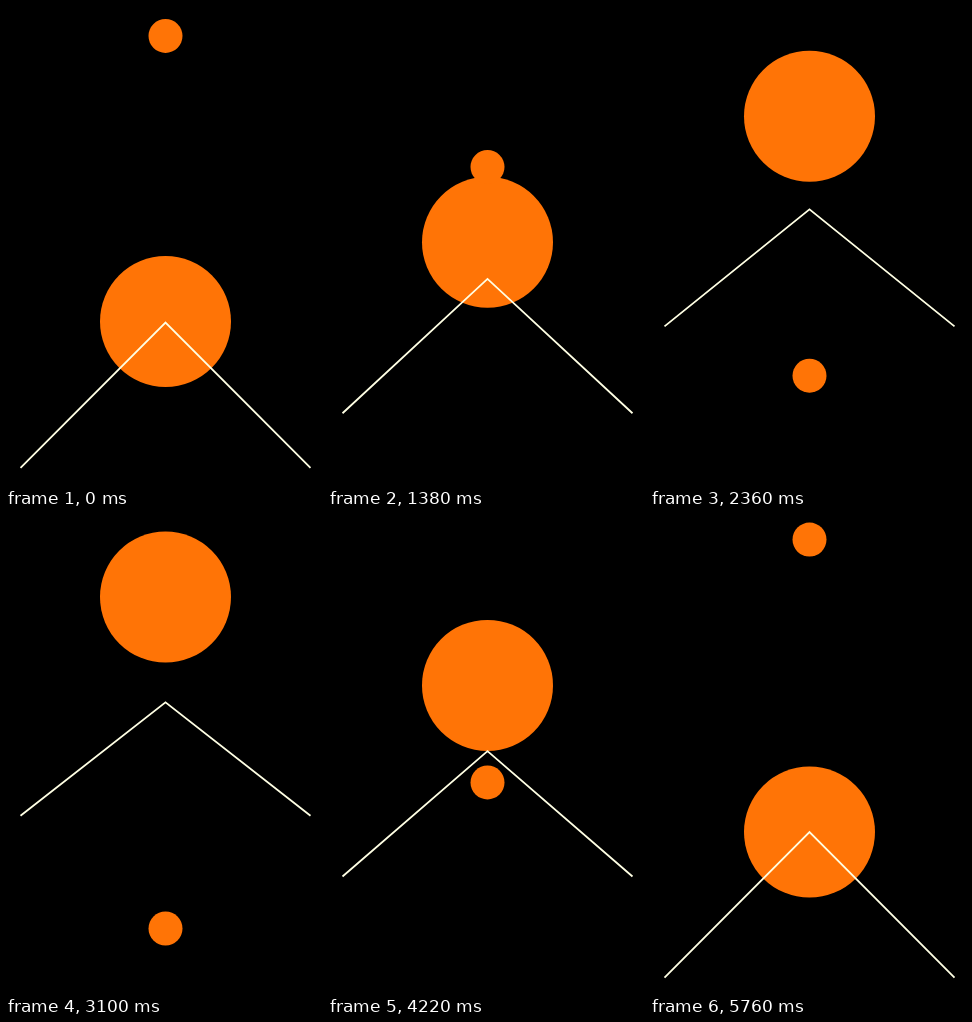
Write an HTML page that moves like this. It is 316x480 px and loops after 5780 ms.

```html
<!DOCTYPE html>
<html lang="en">
<head>
<meta charset="utf-8">
<title>Trading places</title>
<style>
  html, body { margin: 0; width: 100%; height: 100%; overflow: hidden; background: #000; }
  svg { display: block; width: 100%; height: 100%; }
  circle { fill: #ff7406; }
  polyline { fill: none; stroke: #ffffe4; stroke-width: 1.8; }
</style>
</head>
<body>
<svg viewBox="0 0 316 480">
  <circle id="big" cx="159.5" r="65.5"/>
  <circle id="small" cx="159.5" r="17"/>
  <polyline id="roof"/>
</svg>
<script>
  const LOOP = 5780;
  const BEAT = 140;            // three steps per beat, held 20, 100 and 20 ms
  const SWING = 59.86;         // steps from one end of the travel to the other
  const FIRST_TURN = 4.5;      // step at which the travel first turns round

  const big = document.getElementById('big');
  const small = document.getElementById('small');
  const roof = document.getElementById('roof');

  const mix = (a, b, p) => a + (b - a) * p;

  // cubic-bezier(.42, 0, .58, 1), solved by bisection
  function easeInOut(x) {
    let lo = 0, hi = 1;
    for (let i = 0; i < 24; i++) {
      const u = (lo + hi) / 2;
      if (1.26 * u - 0.78 * u * u + 0.52 * u ** 3 < x) lo = u; else hi = u;
    }
    return lo * lo * (3 - 2 * lo);
  }

  function stepAt(ms) {
    const phase = ms % BEAT;
    const step = 3 * Math.floor(ms / BEAT) + (phase >= 20) + (phase >= 120);
    // a brief stutter holds the motion one step back
    return step >= 86 && step <= 91 ? step - 1 : step;
  }

  function draw(ms) {
    const x = Math.abs((stepAt(ms) - FIRST_TURN) / SWING);
    const p = easeInOut(x > 1 ? Math.abs(2 - x) : x);
    const apex = mix(318, 187.9, p);
    const foot = mix(463.6, 301.1, p);
    big.setAttribute('cy', mix(318.1, 82.2, p));
    small.setAttribute('cy', mix(25.6, 416, p));
    roof.setAttribute('points', `14.5,${foot} 159.5,${apex} 304.5,${foot}`);
  }

  const start = performance.now();
  function tick() {
    draw((performance.now() - start) % LOOP);
    requestAnimationFrame(tick);
  }
  draw(0);
  requestAnimationFrame(tick);
</script>
</body>
</html>
```
